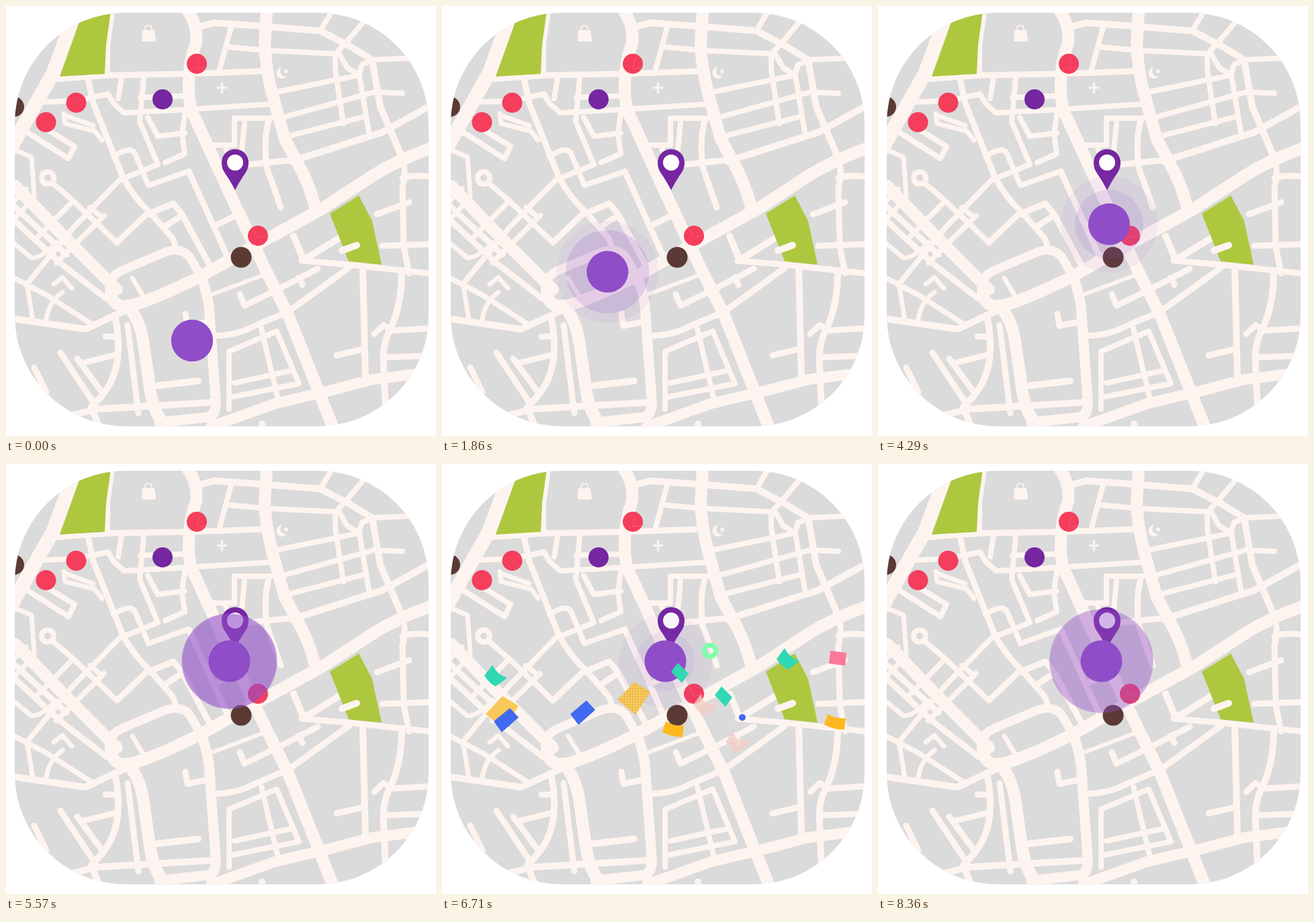
An HTML page for the animation above (8430 ms loop, 640 by 640 pixels).

```html
<!DOCTYPE html>
<html lang="en">
<head>
<meta charset="utf-8">
<title>City map with moving locator</title>
<style>
  html, body { margin: 0; width: 100%; height: 100%; overflow: hidden; background: #fff; }
  svg { display: block; width: 100vw; height: 100vh; }
  #roads path, #lane { fill: none; stroke: #fef4ef; stroke-linecap: round; stroke-linejoin: round; }
</style>
</head>
<body>
<svg viewBox="0 0 640 640">
  <defs>
    <clipPath id="tile"><rect x="13" y="10" width="616" height="615.5" rx="165"/></clipPath>
    <pattern id="dots" width="4" height="4" patternUnits="userSpaceOnUse">
      <rect width="4" height="4" fill="#f9c859"/><circle cx="2" cy="2" r=".7" fill="#b98a3c"/>
    </pattern>
    <pattern id="stripes" width="3" height="3" patternUnits="userSpaceOnUse">
      <rect width="3" height="3" fill="#f9ddd6"/><rect width="3" height="1.2" fill="#e8b5ae"/>
    </pattern>
  </defs>
  <g clip-path="url(#tile)">
    <rect width="640" height="640" fill="#dbdbdb"/>
    <g id="roads"></g>
    <g fill="#adc83e">
      <path d="M109 24L114 8H156L149 58L147 101L80 105Z"/>
      <path d="M482 309L525 282L545 320L559 385L510 380Z"/>
    </g>
    <path id="lane" d="M500 364L522 356" stroke-width="10"/>
    <g fill="#fef4ef">
      <path d="M203 36H221L223 50Q223 53 220 53H205Q202 53 202 50Z"/>
      <path d="M207 38V34Q207 29 212 29Q217 29 217 34V38" fill="none" stroke="#fef4ef" stroke-width="2"/>
      <path d="M320 114H323V120H329V123H323V130H320V123H314V120H320Z"/>
      <path d="M411 91A8.5 8.5 0 1 0 418 104A7.5 7.5 0 0 1 411 91Z"/>
      <path d="M417 93L418.300 95.500L421 96L419 98L419.500 101L417 99.500L414.500 101L415 98L413 96L415.700 95.500Z"/>
    </g>
    <g fill="#5b3a34"><circle cx="12" cy="150" r="15"/><circle cx="350" cy="374" r="15.500"/></g>
  </g>
  <g id="marks"></g>
  <path d="M341 274Q335 262 326 249Q321 242 321 233A20 20 0 0 1 361 233Q361 242 356 249Q347 262 341 274Z" fill="#7526a0"/>
  <circle cx="341" cy="233" r="12" fill="#fff"/>
  <g fill="#8f4dc8"><circle id="outer"/><circle id="inner"/><circle id="dot"/></g>
  <g id="confetti"></g>
</svg>
<script>
const LOOP = 8430, PULSE = 2290, BURST = 5680, POSE = 6710;
const $ = id => document.getElementById(id);

function add(parent, tag, attrs) {
  const el = document.createElementNS('http://www.w3.org/2000/svg', tag);
  for (const key in attrs) el.setAttribute(key, attrs[key]);
  return parent.appendChild(el);
}

// Streets, grouped by district: [width, path]
const streets = [
  // main roads
  [21, 'M104 8L70 100L5 215'],
  [18, 'M271 8Q286 30 283 55Q272 85 272 115Q271 150 282 168L325 262L385 390L420 460L487 628'],
  [18, 'M388 8L385 55Q386 90 396 130L415 198L440 245Q455 275 461 304'],
  [18, 'M640 209Q585 228 545 253L470 302L375 354L290 402Q215 440 180 447Q160 447 156 430'],
  [18, 'M14 268L90 347L165 422'],
  [13, 'M155 430Q148 404 174 393L238 366Q264 358 275 376L290 402'],
  [18, 'M180 446Q200 465 205 505L215 575Q220 602 231 617'],
  [15, 'M289 400Q302 430 303 460L312 585Q314 609 300 612L228 620'],
  [16, 'M305 626L400 592L480 573L545 556L640 544'],
  [10, 'M8 465L118 481L178 453'],
  // north west
  [9, 'M70 109L155 103L270 101L382 97'],
  [8, 'M158 8L151 58V103'],
  [8, 'M55 143L105 141L152 131L160 145L176 159L270 154L395 146'],
  [8, 'M172 106L167 138M205 106L199 172L226 236L172 258M200 136L265 134'],
  [9, 'M122 108L130 145L174 255Q190 285 215 308L243 340Q254 352 251 362'],
  [8, 'M211 166L226 194L266 189M266 160L262 190L266 220L237 233'],
  [8, 'M160 224Q188 206 193 222L212 267L272 246'],
  [9, 'M272 246L330 374M315 325L342 312'],
  [9, 'M165 352L208 311L249 294L262 310L302 384M235 329L260 313'],
  [7, 'M86 160L88 175L132 186L143 200M88 163L130 178'],
  [8, 'M30 187L93 227L102 209M55 180L102 209'],
  // west
  [7, 'M8 212L38 225L42 280'],
  [8, 'M70 264L100 290L165 352M172 256L100 330L30 415'],
  [8, 'M98 292L45 346M146 312L75 382M125 300L142 314'],
  [9, 'M8 315L80 382L150 436M8 294L90 370'],
  [7, 'M8 350L38 375Q55 374 75 352M30 272L12 290M42 285L14 315'],
  [8, 'M8 403L60 430L130 475'],
  [7, 'M32 418L40 468M60 466Q64 440 84 426M71 414L84 404L98 420'],
  [7, 'M188 405L203 430'],
  // centre
  [8, 'M395 167H340V207H310M355 174L351 215M326 207L331 225'],
  [9, 'M391 171Q383 200 388 240L409 300M361 236L427 229'],
  [6, 'M302 431L384 400'],
  [9, 'M348 429L355 446L410 419L464 391M436 404L441 415'],
  [9, 'M310 491Q345 490 370 476L420 455L510 390'],
  [9, 'M267 458L270 476L300 470'],
  // north east
  [10, 'M284 32L310 25L380 30L468 37L512 60L545 80L557 150L588 222'],
  [8, 'M336 28L318 94M332 61L385 66L488 71M485 8L468 37'],
  [8, 'M535 20L510 50L490 72V95L502 175M495 70L508 92L526 103L540 188'],
  [8, 'M398 129L525 103L530 87L548 80L635 76'],
  [8, 'M408 167L548 128L590 130M415 195L532 165'],
  [10, 'M425 231L560 188L640 144'],
  [9, 'M586 220Q598 240 590 270L592 358L600 398M590 256Q610 250 635 255M552 310L600 292'],
  [9, 'M560 357L640 354M440 379L510 385L640 399'],
  [10, 'M428 342L443 378L500 343'],
  // south east
  [8, 'M332 600V514L403 484L436 562L336 582M340 561L424 543M380 480L405 586'],
  [10, 'M531 390L535 556M589 400Q588 450 570 485Q560 505 562 535L565 600'],
  [9, 'M492 520L530 511M548 488L562 475L575 483L640 479M563 523L640 520M598 550L606 585'],
  // south west
  [10, 'M162 460Q174 520 158 555Q150 575 127 597L140 630'],
  [9, 'M148 492H165M181 475L197 606M115 531L160 520'],
  [9, 'M81 516L130 590M106 525L144 576M42 538L60 575'],
  [10, 'M95 610L135 600L305 590M226 565L286 558M381 622L382 630']
];
for (const [w, d] of streets) add($('roads'), 'path', { d, 'stroke-width': w });
add($('roads'), 'circle', { cx: 62, cy: 256, r: 9, fill: '#dbdbdb', stroke: '#fef4ef', 'stroke-width': 8 });

const red = '#f53d5c';
for (const [cx, cy, fill] of [[104.5, 144, red], [59.5, 173, red], [284, 86, red], [375, 342, red], [233, 139, '#7526a0']])
  add($('marks'), 'circle', { cx, cy, r: 15, fill });
add($('marks'), 'path', { d: 'M287 78L284 92.500H298M368 331L375 346L388 340', fill: 'none', stroke: '#fa7186', 'stroke-width': .6 });

// Confetti: [shape, colour, x, y, spin, opacity] at its widest spread
const shapes = {
  slab: 'M0-24L24-9L2 25L-25 3Z',
  tile: 'M-18 2L6-18L19-4L-6 18Z',
  chip: 'M-13-2L-3-15L13 1L3 15Z',
  card: 'M-11-11L13-8L11 11L-13 8Z',
  wave: 'M-17 0L-5-16Q1-2 17 3L0 16Q-8 13-17 0Z',
  flag: 'M-11-12Q2-4 16-6L14 11Q-1 12-16 4Z',
  moon: 'M-18 0L-6-16Q-4 2 19-3Q10 14-5 17Q-12 8-18 0Z',
  ring: 'M0-8.500A8.500 8.500 0 1 1 0 8.500A8.500 8.500 0 1 1 0-8.500Z',
  spot: 'M0-5A5 5 0 1 1 0 5A5 5 0 1 1 0-5Z'
};
const teal = '#30d8b3', blue = '#4169f1', amber = '#ffb91f';
const pieces = [
  ['wave', teal, 80, 315, 90, 1], ['slab', '#f9c859', 90, 369, -60, 1],
  ['tile', blue, 95, 381, 70, 1], ['tile', blue, 209, 370, -80, 1],
  ['slab', 'url(#dots)', 286, 348, 60, 1], ['flag', amber, 344, 395, 80, 1],
  ['chip', teal, 354, 311, -120, 1], ['moon', 'url(#stripes)', 392, 358, -70, .8],
  ['chip', teal, 419, 346, 110, 1], ['moon', 'url(#stripes)', 440, 413, 80, .8],
  ['spot', blue, 447, 377, 0, 1], ['ring', '#7dffa9', 399, 278, 0, 1],
  ['wave', teal, 515, 290, -90, 1], ['flag', amber, 585, 384, 70, 1],
  ['card', '#fb7898', 589, 289, -60, 1]
].map(([shape, fill, x, y, spin, alpha], i) => {
  const hollow = shape === 'ring';
  const el = add($('confetti'), 'path', {
    d: shapes[shape], fill: hollow ? 'none' : fill, stroke: hollow ? fill : 'none', 'stroke-width': 7
  });
  return { el, x, y, spin, alpha, from: x < 345 ? -30 : 670, gone: 7120 + i % 4 * 100 };
});

// Tables of [time, values...]
const route = [[0, 277, 498], [950, 241, 398], [1600, 241, 398], [3290, 352, 347], [3480, 352, 347], [5260, 332.500, 293.500], [LOOP, 332.500, 293.500]];
const outerPulse = [[0, 31, .5], [560, 51, .5], [860, 66, .46], [1000, 71.500, .42], [1490, 77.500, .27], [1860, 76, .07], [2000, 72, .07], [2130, 70, .06], [PULSE, 66, 0]];
const innerSize = [[0, 31], [900, 60], [1490, 76], [1860, 62], [2289, 36], [2290, 31], [3290, 48], [3750, 72], [4290, 51], [4579, 34], [4580, 31], [5570, 70], [6100, 76], [6710, 44], [6869, 34], [6870, 31], [7860, 69], [8360, 76.500], [LOOP, 77]];
const innerFade = [[0, .3], [1000, .3], [1490, .2], [1860, .18], [2000, .13], [2130, .08], [PULSE, 0]];

const linear = u => u;
const smooth = u => u < .5 ? 2 * u * u : 1 - 2 * (1 - u) * (1 - u);
const clamp = v => Math.max(0, Math.min(1, v));

function at(table, t, ease = linear) {
  let i = 1;
  while (i < table.length - 1 && table[i][0] < t) i++;
  const a = table[i - 1], b = table[i];
  const u = ease(clamp((t - a[0]) / (b[0] - a[0])));
  return a.slice(1).map((v, k) => v + (b[k + 1] - v) * u);
}

function place(el, x, y, r, opacity) {
  el.setAttribute('cx', x);
  el.setAttribute('cy', y);
  el.setAttribute('r', r);
  el.setAttribute('opacity', opacity);
}

function drawPiece(p, t) {
  const visible = t > BURST && t < p.gone;
  p.el.setAttribute('display', visible ? 'inline' : 'none');
  if (!visible) return;
  const s = (t - BURST) / 1000, full = (POSE - BURST) / 1000;
  const reach = (1 - Math.exp(-2.800 * s)) / (1 - Math.exp(-2.800 * full));
  const x = p.from + (p.x - p.from) * reach;
  const y = 315 + (p.y - 315) * s / full + 95 * s * (s - full);
  const turn = p.spin * (t - POSE) / 300;
  p.el.setAttribute('transform', `translate(${x} ${y}) rotate(${turn})`);
  p.el.setAttribute('opacity', p.alpha * clamp((p.gone - t) / 350));
}

function draw(t) {
  const [x, y] = at(route, t, smooth), phase = t % PULSE;
  const [r, a] = at(outerPulse, phase);
  place($('outer'), x, y, r, a);
  place($('inner'), x, y, at(innerSize, t)[0], at(innerFade, phase)[0]);
  place($('dot'), x, y, 31, 1);
  for (const p of pieces) drawPiece(p, t);
}

const start = performance.now();
function tick(now) {
  draw(Math.max(0, now - start) % LOOP);
  requestAnimationFrame(tick);
}
draw(0);
requestAnimationFrame(tick);
</script>
</body>
</html>
```
